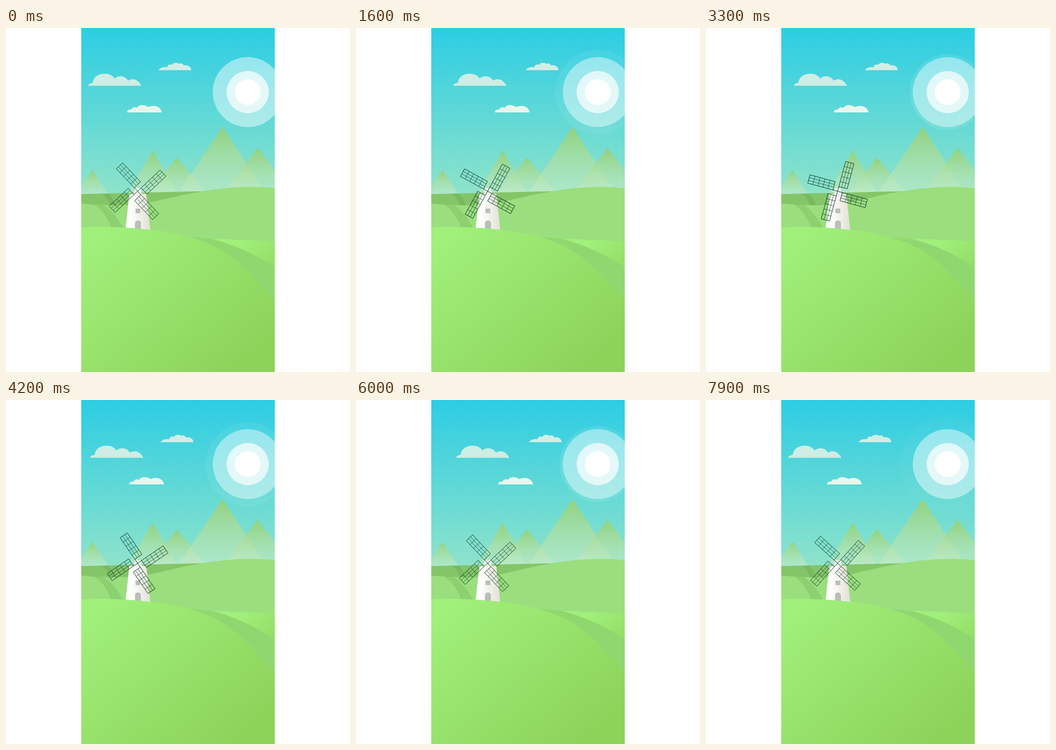
An HTML page that plays this animation: 640 px wide and 640 px high, repeating every 8000 ms.

```html
<!DOCTYPE html>
<html lang="en">
<head>
<meta charset="utf-8">
<title>Windmill</title>
<style>
  html, body { margin: 0; width: 100%; height: 100%; overflow: hidden; background: #fff; }
  svg { display: block; width: 100%; height: 100%; }
</style>
</head>
<body>
<svg viewBox="0 0 640 640">
  <defs>
    <clipPath id="card"><rect x="140" width="360" height="640"/></clipPath>
    <linearGradient id="sky" gradientUnits="userSpaceOnUse" x1="0" y1="0" x2="0" y2="310">
      <stop stop-color="#2ccde4"/><stop offset="1" stop-color="#8fe3ca"/>
    </linearGradient>
    <linearGradient id="peak" x1="0" y1="0" x2="0" y2="1">
      <stop stop-color="#94d176" stop-opacity=".95"/><stop offset="1" stop-color="#c8ecc8" stop-opacity=".5"/>
    </linearGradient>
    <linearGradient id="grass" gradientUnits="userSpaceOnUse" x1="190" y1="370" x2="420" y2="640">
      <stop stop-color="#a0f07b"/><stop offset="1" stop-color="#8dd35a"/>
    </linearGradient>
    <linearGradient id="slope" gradientUnits="userSpaceOnUse" x1="440" y1="395" x2="500" y2="450">
      <stop stop-color="#a0f07b"/><stop offset="1" stop-color="#93dc65"/>
    </linearGradient>
    <linearGradient id="wall">
      <stop offset=".2" stop-color="#fff"/><stop offset="1" stop-color="#e2e0d4"/>
    </linearGradient>
  </defs>
  <g clip-path="url(#card)">
    <rect x="140" width="360" height="640" fill="url(#sky)"/>

    <g fill="#fff">
      <circle id="halo" cx="449.7" cy="119.2" fill="none" stroke="#fff"/>
      <circle cx="449.7" cy="119.2" r="65" opacity=".46"/>
      <circle cx="449.7" cy="119.2" r="39.3" opacity=".7"/>
      <circle cx="449.7" cy="119.2" r="24"/>
    </g>

    <path class="cloud" data-range="35" fill="#cdeee4" d="M153 107.5C154 103.500 157 102.500 161.500 102C162 92 171 85 184 85C193 85 199 89 202 94C210 87 222 89 227 98C236 92 246 96 252 107.500Z"/>
    <path class="cloud" data-range="40" fill="#cfefe6" d="M283.500 78.500C287 73.500 293 72 300 73C300 69 304 67 308.500 68.500C311 64 318 64 322 66.500C326 65 329 66 330.500 69.500C338 68.500 344 71 344.700 78.500Z"/>
    <path class="cloud" data-range="41.5" fill="#e9f6ec" d="M225 157C226 152.500 229 151 233.500 152C234 148 239 146.500 243.500 148.500C247 142 258 142 264.500 147C275 142.500 288 145 290 157Z"/>

    <g fill="url(#peak)">
      <path d="M161 264L190.500 309H131.500Z"/>
      <path d="M273 228L319 308H227Z"/>
      <path d="M318 241L373 307H264Z"/>
      <path d="M403 184L483 307H320Z"/>
      <path d="M468 223L532 307H404Z"/>
    </g>

    <path fill="#84c568" d="M140 309L372 303.500V340H140Z"/>
    <path fill="#79b95f" d="M179 308H191C198 315 202 322 205 332H194C191 321 186 313 179 308Z"/>
    <path fill="#9bde7e" d="M140 326.500C190 331.500 235 331 275 323C330 310 390 295.500 455 295.500C472 295.500 486 296.500 500 298V400H140Z"/>
    <path fill="#8cd070" d="M163 328.500C178 336 188 352 197 374H219C208 354 196 338 182 329.800Z"/>

    <path fill="url(#slope)" d="M340 390L500 397V520H400Z"/>
    <path fill="#91d770" d="M340 389L382 392C425 403 465 422 500 445V515H430Z"/>

    <path fill="url(#wall)" d="M229.500 308.500H261L268.700 378H222Z"/>
    <path fill="#f4f4ef" d="M238 309L240 298H250.500L252.500 309Z"/>
    <path fill="#b8bfbb" d="M241 336h8.800v8.500h-8.800zM240 378V363.500a5.500 5.500 0 0 1 11 0V378Z"/>
    <path fill="url(#grass)" d="M140 371C175 368.800 222 370.500 268 375.300C300 378.500 325 384 347 390.500C410 408 448 446 500 507V640H140Z"/>
    <g id="sails" fill="none" stroke="#103f2c"></g>
  </g>
</svg>
<script>
  const LOOP = 8000, LEAD = 50;
  const halo = document.getElementById('halo');
  const sails = document.getElementById('sails');
  const clouds = [...document.querySelectorAll('.cloud')];

  // One sail: a spar from the hub with a 3 by 5 lattice on its clockwise side
  const NEAR = 9, LENGTH = 48.5, WIDTH = 16;
  let lattice = '';
  for (let i = 1; i < 3; i++) lattice += `M${i * WIDTH / 3} ${-NEAR}v${-LENGTH}`;
  for (let i = 1; i < 5; i++) lattice += `M0 ${-NEAR - i * LENGTH / 5}h${WIDTH}`;
  const frame = `M0 0V${-NEAR - LENGTH}h${WIDTH}v${LENGTH}H0`;
  sails.innerHTML = [0, 90, 180, 270].map(a =>
    `<g transform="rotate(${a})"><path stroke-width=".9" d="${frame}"/>` +
    `<path stroke-width=".65" d="${lattice}"/></g>`).join('');

  function draw(ms) {
    const t = ms % LOOP;
    sails.setAttribute('transform', `translate(244.800 303.700) rotate(${-43.4 + t * 360 / LOOP})`);

    // Clouds drift out and back at a steady pace
    const u = (t + LEAD) % 4000 / 2000;
    const drift = (u < 1 ? u : 2 - u) - LEAD / 2000;
    for (const c of clouds) c.setAttribute('transform', `translate(${c.dataset.range * drift} 0)`);

    // The halo grows outward from the sun's rim while it fades
    const p = (t + LEAD) % LOOP * 3 / LOOP % 1;
    const spread = 0.4 + 23.3 * p ** 1.15;
    halo.setAttribute('r', 65 + spread / 2);
    halo.setAttribute('stroke-width', spread);
    halo.setAttribute('stroke-opacity', 0.12 - 0.095 * p);
  }

  const start = performance.now();
  function tick() {
    draw(performance.now() - start);
    requestAnimationFrame(tick);
  }
  tick();
</script>
</body>
</html>
```
